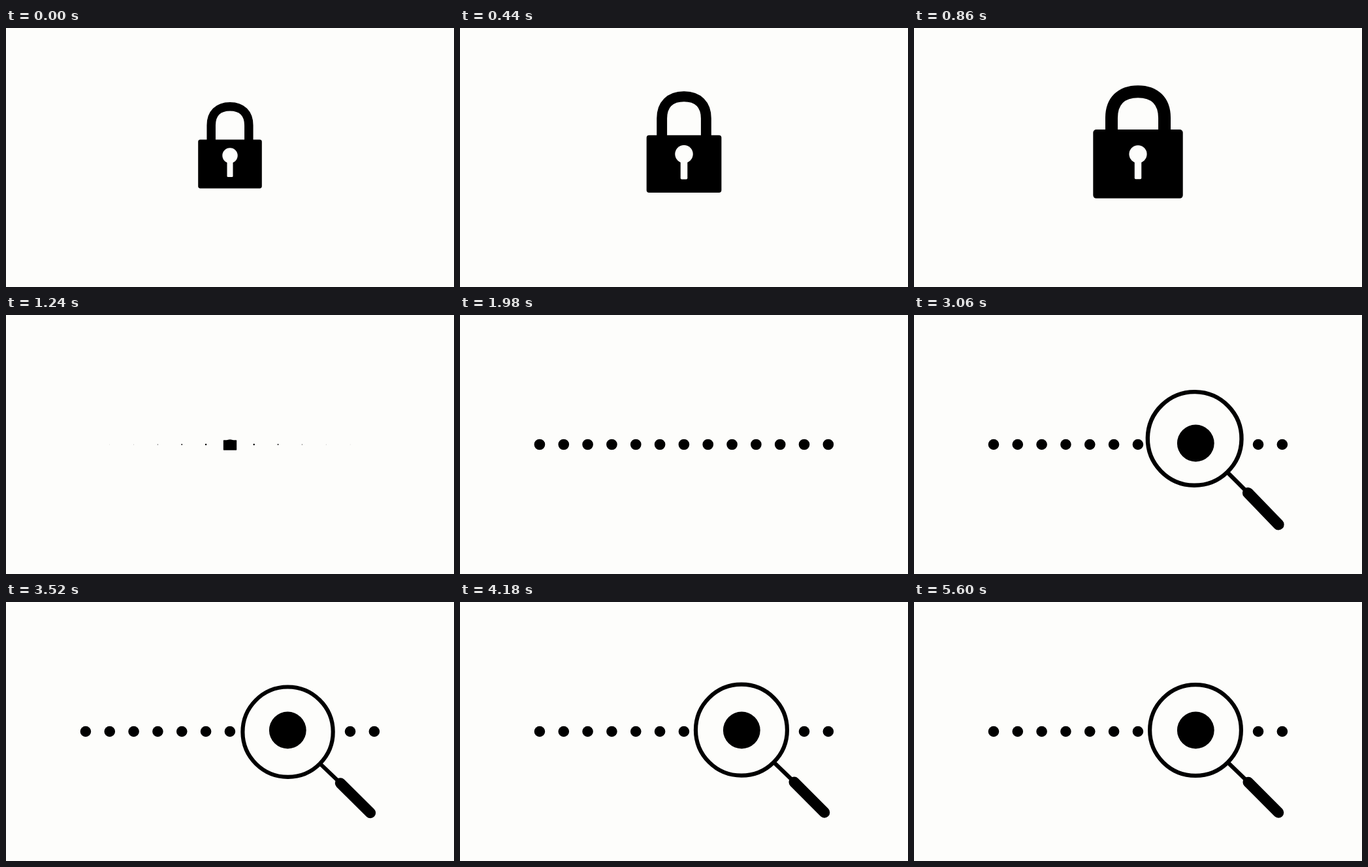
An HTML page with a canvas that plays this animation: 686x398 px, repeating every 5.82 s.

```html
<!DOCTYPE html>
<html lang="en">
<head>
<meta charset="utf-8">
<title>Lock to magnifier</title>
<style>
  html, body { margin: 0; width: 100%; height: 100%; overflow: hidden; background: #fdfdfb; }
  canvas { display: block; }
</style>
</head>
<body>
<canvas id="stage" width="686" height="398"></canvas>
<script>
const LOOP = 5820;
const PAPER = '#fdfdfb';
const INK = '#000';
const ctx = document.getElementById('stage').getContext('2d');

// Steps come in an uneven rhythm: one held for 100 ms, then two for 20 ms.
function stepAt(ms) {
  if (ms < 20) return 0;
  const beat = Math.floor((ms - 20) / 140);
  const rest = (ms - 20) % 140;
  return 1 + 3 * beat + (rest >= 100) + (rest >= 120);
}

function disc(x, y, r, color = INK) {
  ctx.fillStyle = color;
  ctx.beginPath();
  ctx.arc(x, y, r, 0, 2 * Math.PI);
  ctx.fill();
}

function box(x, y, w, h, r, color = INK) {
  ctx.fillStyle = color;
  ctx.beginPath();
  ctx.roundRect(x, y, w, h, r);
  ctx.fill();
}

function line(x1, y1, x2, y2, width, cap) {
  ctx.lineWidth = width;
  ctx.lineCap = cap;
  ctx.beginPath();
  ctx.moveTo(x1, y1);
  ctx.lineTo(x2, y2);
  ctx.stroke();
}

function lockScale(n) {
  const swell = k => 1 + 0.22 * (1 - Math.cos(Math.PI * k / 23));
  return n < 22 ? swell(n) : swell(22) * Math.pow(Math.max(0, (27 - n) / 5), 1.2);
}

function drawLock(n) {
  const scale = lockScale(n);
  if (scale <= 0) return;
  const sink = Math.pow(Math.max(0, (n - 14) / 12), 2);
  const lift = Math.max(0, n - 22) * 2.25;
  ctx.save();
  ctx.translate(343, 209 - lift);
  ctx.scale(scale, scale);

  // Shackle, with shoulders a little fuller than a circle
  const y = 53 * sink;
  const r = 28.8, bend = 0.63 * r;
  ctx.strokeStyle = INK;
  ctx.lineWidth = 13.5;
  ctx.lineCap = 'butt';
  ctx.beginPath();
  ctx.moveTo(-r, y - 36);
  ctx.lineTo(-r, y - 59.5);
  ctx.bezierCurveTo(-r, y - 59.5 - bend, -bend, y - 88.3, 0, y - 88.3);
  ctx.bezierCurveTo(bend, y - 88.3, r, y - 59.5 - bend, r, y - 59.5);
  ctx.lineTo(r, y - 36);
  ctx.stroke();

  // Body and keyhole
  box(-48.8, -37.6, 97.6, 75.1, 3.4);
  const hole = Math.max(0, 1 - sink);
  if (hole > 0) {
    ctx.scale(hole, hole);
    disc(0, -13, 11.7, PAPER);
    box(-4.5, -13, 9, 33, 1.5, PAPER);
  }
  ctx.restore();
}

// Damped spring from 0 to 1
function spring(age) {
  if (age <= 0) return 0;
  const a = 0.31, b = 0.55;
  return 1 - Math.exp(-a * age) * (Math.cos(b * age) + a / b * Math.sin(b * age));
}

function drawDots(n) {
  for (let k = -6; k <= 6; k++) {
    const r = 8.3 * spring(n - 24.9 - 0.15 * Math.abs(k));
    if (r > 0) disc(342.9 + 36.83 * k, 199, r);
  }
}

// Offset of the magnifier's scale from 1: straight rise, then a soft bounce
function glassOffset(n) {
  const t = n - 54.8;
  if (t < 0) return Math.max(-1, 0.094 * t);
  return 0.062 * Math.exp(-t / 14) * Math.sin(2 * Math.PI * t / 33);
}

function drawGlass(n) {
  const off = glassOffset(n);
  if (off <= -1) return;
  const place = () => {
    ctx.translate(577.6, 367);
    ctx.rotate(off * 32 * Math.PI / 180);
    ctx.scale(1 + off, 1 + off);
    ctx.translate(-577.6, -367);
  };

  ctx.save();
  place();
  ctx.strokeStyle = INK;
  line(480, 246, 512, 277, 6.2, 'butt');
  line(511.8, 277, 558, 323.5, 16.6, 'round');
  disc(431, 197, 70, PAPER);
  ctx.lineWidth = 6.2;
  ctx.beginPath();
  ctx.arc(431, 197, 69.9, 0, 2 * Math.PI);
  ctx.stroke();
  ctx.restore();

  // The enlarged dot stays put; the lens reveals it
  ctx.save();
  ctx.save();
  place();
  ctx.beginPath();
  ctx.arc(431, 197, 66.2, 0, 2 * Math.PI);
  ctx.restore();
  ctx.clip();
  disc(431.3, 197, 28.4);
  ctx.restore();
}

const start = performance.now();

function draw() {
  const n = stepAt((performance.now() - start) % LOOP);
  ctx.fillStyle = PAPER;
  ctx.fillRect(0, 0, 686, 398);
  drawLock(n);
  drawDots(n);
  drawGlass(n);
  requestAnimationFrame(draw);
}
draw();
</script>
</body>
</html>
```
